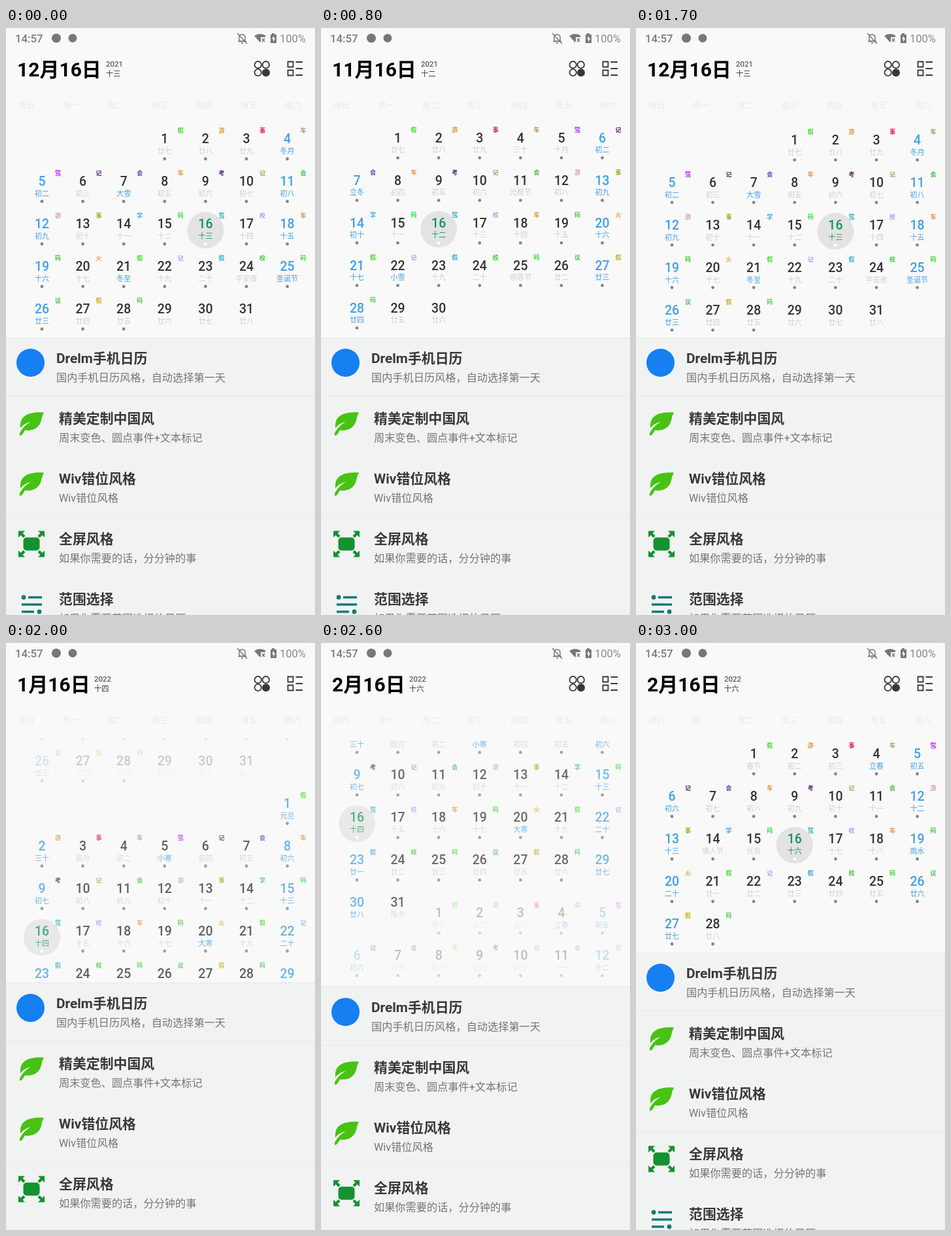
An HTML page that plays this animation: 473x897 px, repeating every 3100 ms.

```html
<!DOCTYPE html>
<html lang="zh-CN">
<head>
<meta charset="utf-8">
<style>
html, body { margin: 0; width: 100%; height: 100%; overflow: hidden; background: #f9f9f9; }
svg { display: block; width: 473px; height: 897px; font-family: Roboto, "Noto Sans CJK SC", "Noto Sans CJK", sans-serif; }
.mid { text-anchor: middle; }
</style>
</head>
<body>
<svg id="stage" viewBox="0 0 473 897"></svg>
<script>
const ROW = 65, TOP = 146, LOOP = 3100;
const BLUE = '#409fea', GREEN = '#12945a';

const months = [
  { name: '11月', year: 2021, first: 1, days: 30, lunar: 27, len: 30, next: '十月', tag: '十二',
    special: { 7: '立冬', 11: '光棍节', 22: '小雪', 25: '感恩节' } },
  { name: '12月', year: 2021, first: 3, days: 31, lunar: 27, len: 29, next: '冬月', tag: '十三',
    special: { 7: '大雪', 21: '冬至', 24: '平安夜', 25: '圣诞节' } },
  { name: '1月', year: 2022, first: 6, days: 31, lunar: 29, len: 30, next: '腊月', tag: '十四',
    special: { 1: '元旦', 5: '小寒', 20: '大寒', 31: '除夕' } },
  { name: '2月', year: 2022, first: 2, days: 28, lunar: 1, len: 30, next: '二月', tag: '十六',
    special: { 1: '春节', 4: '立春', 14: '情人节', 15: '元宵', 19: '雨水' } }
];
const terms = '立冬 小雪 大雪 冬至 小寒 大寒 立春 雨水'.split(' ');
const marks = [...'假游事车驾记会车考记会游事学码驾校车码火假记假校码议假码'];
const markColors = ('40db25 e69138 df1356 b0956a bc13f0 542261 4a4bb2 e69138 542261 87af5a 40c040 cda1af 95af1a ' +
  '33aadd 30e040 22acaf 99a6fa e69138 40cb35 e6a138 40db25 99a6fa 33aadd 40cb35 30e030 40c050 c5b01a 50c850').split(' ');

// Swipes between months: `flip` is the delay before the title changes.
const swipes = [
  { at: 400, from: 1, to: 0, pitch: 325, lead: 63, dur: 558, flip: 100 },
  { at: 1300, from: 0, to: 1, pitch: 325, lead: 63, dur: 558, flip: 100 },
  { at: 1900, from: 1, to: 2, pitch: 325, lead: 50, dur: 390, flip: 0 },
  { at: 2600, from: 2, to: 3, pitch: 341, lead: 49, dur: 460, flip: 0 }
];

// Text placed by its vertical centre
const text = (x, y, size, fill, str, attrs = '') =>
  `<text x="${x}" y="${y + size * .37}" font-size="${size}" fill="${fill}" ${attrs}>${str}</text>`;
const circle = (x, y, r, fill, attrs = '') => `<circle cx="${x}" cy="${y}" r="${r}" fill="${fill}" ${attrs}/>`;
const path = (d, attrs) => `<path d="${d}" ${attrs}/>`;
const mid = 'class="mid"';

function lunarName(m, day) {
  let n = m.lunar + day - 1;
  if (n > m.len) n -= m.len;
  if (m.special[day]) return m.special[day];
  if (n === 1) return m.next;
  if (n === 20) return '二十';
  if (n === 30) return '三十';
  const unit = '十一二三四五六七八九'[n % 10];
  return (n <= 10 ? '初' : n < 20 ? '十' : '廿') + unit;
}

function dayCell(m, day) {
  const cell = m.first + day - 1, col = cell % 7;
  const x = 55 + 62.6 * col, y = TOP + ROW * Math.floor(cell / 7);
  const chosen = day === 16, weekend = col % 6 === 0, label = lunarName(m, day);
  const main = chosen ? GREEN : weekend ? BLUE : '#333';
  const sub = chosen ? GREEN : weekend || terms.includes(label) ? BLUE : '#cfcfcf';
  let out = chosen ? circle(x, y + 33, 28, '#e3e3e3') : '';
  out += text(x, y + 23, 19.5, main, day, mid + ' font-weight="500"') + text(x, y + 42, 11, sub, label, mid);
  if (day <= 28) {
    out += circle(x, y + 54, 2.4, chosen ? '#fff' : '#858585');
    out += text(x + 24.5, y + 11, 9, '#' + markColors[day - 1], marks[day - 1], mid + ' font-weight="700"');
  }
  return out;
}

const monthGroup = m =>
  `<g class="month">${Array.from({ length: m.days }, (_, i) => dayCell(m, i + 1)).join('')}</g>`;

const leaf = y => path('M58-17C44-18 31-16 25-8Q21-2 22 7Q27 0 38-3Q28 3 23 11Q20 15 21 18Q24 19 26 15L29 10' +
  'C42 12 51 6 54-5Q55-12 58-17Z', `fill="#47c313" transform="translate(0 ${y})"`);

const corner = (sx, sy) =>
  path('M20-20V-10L16.5-13.5L12.5-9.5L9.5-12.5L13.5-16.5L10-20Z', `transform="translate(39 788.5) scale(${sx} ${sy})"`);

const items = [
  [77, 'Drelm手机日历', '国内手机日历风格，自动选择第一天'],
  [81, '精美定制中国风', '周末变色、圆点事件+文本标记'],
  [81, 'Wiv错位风格', 'Wiv错位风格'],
  [81, '全屏风格', '如果你需要的话，分分钟的事'],
  [81, '范围选择', '如果你需要范围选择的日历']
];
const itemText = ([x, head, note], i) =>
  text(x, 504.5 + 92 * i, 20.9, '#383838', head, 'font-weight="700"') +
  text(x, 534 + 92 * i, 16.2, '#757575', note);

const list = `<g id="list">
  <rect y="473" width="473" height="500" fill="#f1f3f2"/>
  ${path('M0 473.5H473M0 562.5H473M0 747H473', 'stroke="#e8e9e8"')}
  ${items.map(itemText).join('')}
  ${circle(37.5, 511.5, 21.5, '#167ff2')}
  ${leaf(604.5)}${leaf(696.5)}
  <g fill="#14922f"><rect x="26.5" y="778.5" width="25" height="20" rx="5"/>
    ${corner(1, 1)}${corner(-1, 1)}${corner(1, -1)}${corner(-1, -1)}</g>
  ${path('M34 870H55M24 881H55M24 892H43', 'stroke="#167a74" stroke-width="3.6"')}
  ${circle(27, 870, 3.4, '#167a74')}${circle(51, 892, 3.4, '#167a74')}
</g>`;

const statusBar = text(14, 16, 16.8, '#7b7b7b', '14:57', 'font-weight="500"') +
  circle(77, 15.5, 7, '#777') + circle(102, 15.5, 6.5, '#777') +
  path('M357 20V14Q357 10 361 10Q366 10 366 14V20ZM355 20.5H368M360 23H363M354 8L369 24', 'fill="none" stroke="#777" stroke-width="1.5"') +
  path('M380 12Q389 6 398 12L396 14H390V20L389 22Z', 'fill="#777"') +
  path('M392 16L396 21M396 16L392 21', 'stroke="#777" stroke-width="1.5"') +
  path('M405 10H407V8H411V10H414V23H405Z', 'fill="#777"') +
  path('M410 11.5L407 17H409V21.5L412.5 15.5H410Z', 'fill="#f9f9f9"') +
  text(419, 16, 16.5, '#888', '100%');

const ring = 'stroke="#383838" stroke-width="1.8"';
const toolbar = circle(385.7, 56.2, 5.2, 'none', ring) + circle(397.8, 56.2, 5.2, 'none', ring) +
  circle(385.7, 68, 5.2, 'none', ring) + circle(398, 68.2, 6, '#383838') +
  path('M431.5 51.5H439.5V59.5H431.5ZM431.5 64.5H439.5V72.5H431.5ZM443.5 52H454M443.5 62H454M443.5 72H454', 'fill="none" ' + ring);

const weekdays = [...'日一二三四五六']
  .map((d, i) => text(31.5 + 68 * i, 118.5, 12.5, '#e9e9e9', '周' + d, mid)).join('');

const $ = id => document.getElementById(id);
$('stage').innerHTML = `<clipPath id="pager"><rect y="${TOP}" width="473" height="760"/></clipPath>
  <rect width="473" height="897" fill="#f9f9f9"/>
  ${statusBar}${toolbar}${weekdays}
  ${text(17, 63, 30, '#000', '', 'id="date" font-weight="700"')}
  <g id="side">${text(0, 54.5, 11.5, '#333', '', 'id="year"')}${text(0, 70, 11.3, '#333', '', 'id="tag"')}</g>
  <g clip-path="url(#pager)">${months.map(monthGroup).join('')}</g>
  ${list}`;
const groups = document.querySelectorAll('.month');

function place(index, y, alpha) {
  groups[index].setAttribute('transform', `translate(0 ${y})`);
  groups[index].setAttribute('opacity', alpha);
}

function showTitle(m) {
  $('date').textContent = m.name + '16日';
  $('year').textContent = m.year;
  $('tag').textContent = m.tag;
  $('side').setAttribute('transform', `translate(${m.name.length > 2 ? 153 : 135} 0)`);
}

const extraHeight = m => ROW * (Math.ceil((m.first + m.days) / 7) - 5);

function draw() {
  // The picture advances in steps of 100 ms.
  const t = Math.floor(performance.now() % LOOP / 100) * 100;
  const s = swipes.filter(w => w.at <= t).pop() || swipes[0];
  const u = t < s.at ? 0 : Math.min(1, (t - s.at + s.lead) / s.dur);
  const p = 1 - (1 - u) ** 3;
  const shift = s.pitch * Math.sign(s.to - s.from);

  groups.forEach((_, i) => place(i, 0, 0));
  place(s.from, -shift * p, 1 - p);
  place(s.to, shift * (1 - p), p);
  showTitle(months[t >= s.at + s.flip ? s.to : s.from]);

  const a = extraHeight(months[s.from]), b = extraHeight(months[s.to]);
  $('list').setAttribute('transform', `translate(0 ${a + (b - a) * p ** 1.3})`);
  requestAnimationFrame(draw);
}
draw();
</script>
</body>
</html>
```
